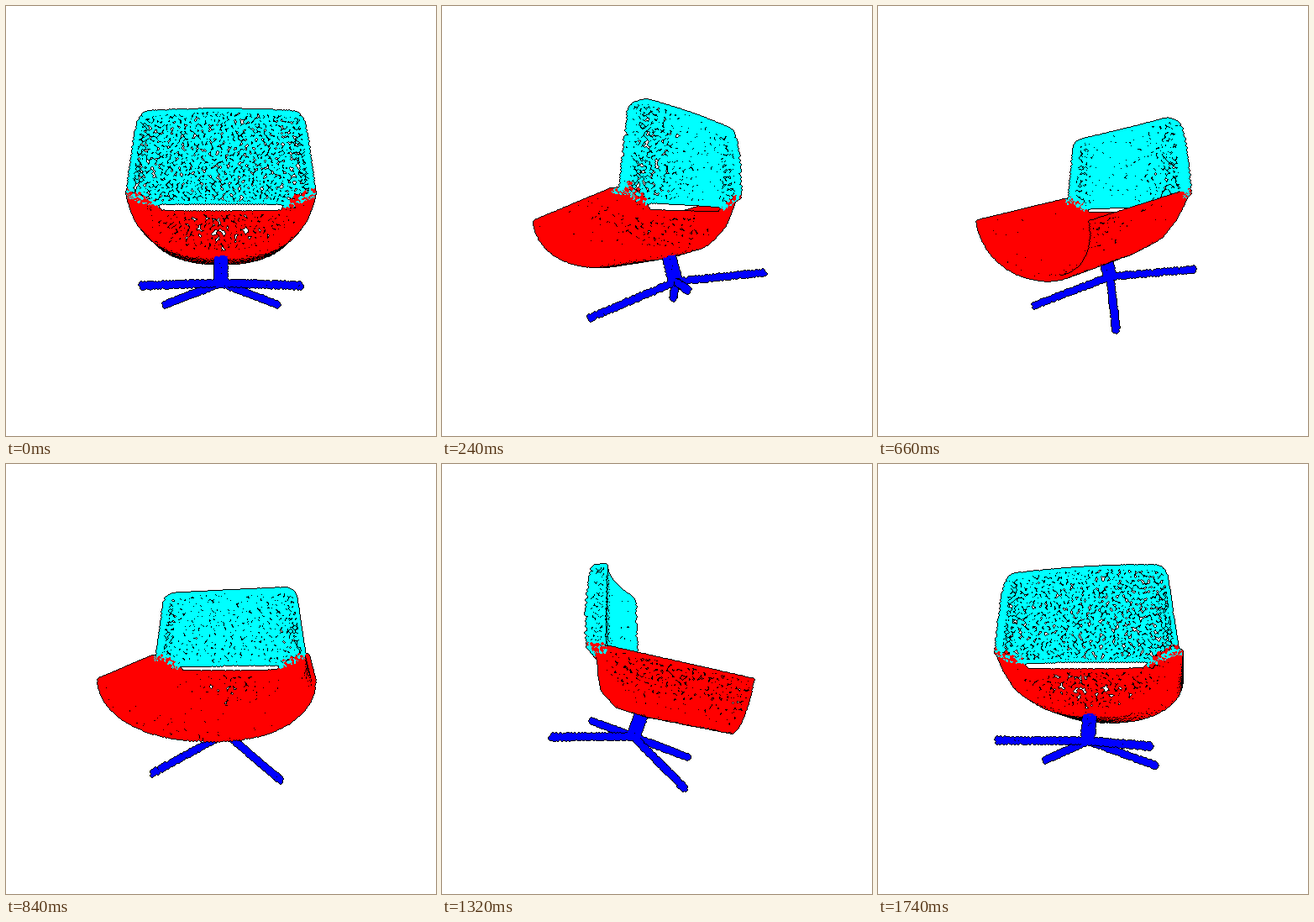
A matplotlib script that plays this animation: 512x512 px, repeating every 1800 ms.

```python
import numpy as np
import matplotlib.pyplot as plt
from matplotlib.animation import FuncAnimation

SIZE, FRAMES, STEP = 512, 30, 60
FOCAL = SIZE / 2 / np.tan(np.radians(30))
CYAN, RED, BLUE = (0, 255, 255), (255, 0, 0), (0, 0, 255)
rng = np.random.default_rng(4)


def spread(n):
    """Evenly scattered pairs in the unit square."""
    i = np.arange(n)
    u = (i * 0.7548777 + rng.random() + rng.normal(0, 0.006, n)) % 1
    v = (i * 0.5698403 + rng.random() + rng.normal(0, 0.006, n)) % 1
    return u, v


def seam(x):
    """Height of the lower edge of the backrest."""
    return np.interp(abs(x), [0, 64, 69, 97], [19.5, 19.5, 18, 30])


def back(u, v, face):
    """Backrest; face runs from -1 (front) to 1 (rear)."""
    x = u * np.interp(v, [0, 0.45, 0.85, 1], [97, 92, 88, 86])
    low = seam(x)
    top = 116 - 3 * u**2 - 10 * abs(u) ** 24
    bow = 4 * v * (1 - v)
    mid = 50 + 3 * v + 3 * bow
    front = mid + (41 - mid) * u**2
    rear = mid + (55 + 4 * bow - mid) * u**4
    z = front + (rear - front) * (face + 1) / 2
    return np.stack([x, low + (top - low) * v, z], 1)


def seat(u, v):
    """Bowl between a centre profile and the raised side rims."""
    knots = [0, 0.11, 0.18, 0.29, 0.48, 0.75, 1]
    cy = np.interp(v, knots, [9, -5, -17, -32, -42, -51, -59])
    cz = np.interp(v, knots, [46, 56, 56, 43, 9, -40, -84])
    rx = np.interp(v, [0, 0.11, 1], [98, 101, 104])
    ry = np.interp(v, [0, 0.11, 1], [29, 29, -1])
    rz = np.interp(v, [0, 0.11, 1], [52, 34, -96])
    power = 2 / 2.2
    a = u * np.pi / 2
    x = rx * np.sign(a) * abs(np.sin(a)) ** power
    w = 1 - np.cos(a) ** power
    edge = np.interp(abs(x), [0, 64, 69, 98], [9, 9, 16, 29])
    k = np.clip(1 - v / 0.06, 0, 1)
    y = (cy + (ry - cy) * w) * (1 - k) + edge * k
    return np.stack([x, y, cz + (rz - cz) * w], 1)


def tube(p, q, r, n):
    p, q = np.array(p, float), np.array(q, float)
    d = (q - p) / np.linalg.norm(q - p)
    e = np.cross(d, [0.3, 1, 0.2])
    e /= np.linalg.norm(e)
    f = np.cross(d, e)
    a, t = spread(n)
    a = a[:, None] * 2 * np.pi
    return p + t[:, None] * (q - p) + r * (np.cos(a) * e + np.sin(a) * f)


def build():
    parts = []

    def add(points, color):
        parts.append((points, np.tile(color, (len(points), 1))))

    u, v = spread(2300)
    add(back(2 * u - 1, v, rng.choice([-1, 1], len(u))), CYAN)
    f, v = spread(200)
    for side in (-1, 1):
        add(back(side + 0 * v, v, 2 * f - 1), CYAN)
    u, f = spread(240)
    add(back(2 * u - 1, 1 + 0 * u, 2 * f - 1), CYAN)
    line = np.linspace(-1, 1, 70)
    for end in (0, 1):
        for face in (-1, 1):
            add(back(line, end + 0 * line, face), CYAN)

    u, v = spread(8000)
    add(seat(2 * u - 1, v), RED)
    line = np.linspace(-1, 1, 110)
    for end in (0, 1):
        add(seat(line, end + 0 * line), RED)
        add(seat(2 * end - 1 + 0 * line, (line + 1) / 2), RED)

    hub = np.array([0, -69, 28.4])
    axis = np.array([0, 0.942, -0.336])
    for side in (-1, 1):
        add(tube(hub, (74 * side, -59.3, 102), 2.3, 210), BLUE)
        add(tube(hub, (73.5 * side, -108, -35.5), 2.3, 210), BLUE)
    add(tube(hub - 2 * axis, hub + 30 * axis, 6, 150), BLUE)
    add(tube(hub + 30 * axis, hub + 34 * axis, 6, 30), RED)
    points, colors = map(np.concatenate, zip(*parts))

    # the two shells mingle along the seam at the sides
    x, y, z = points.T
    mixed = (abs(x) > 68) & (abs(y - seam(x)) < 5) & (z > 35)
    pick = rng.random(len(x)) < 0.5
    colors[mixed & pick] = CYAN
    colors[mixed & ~pick] = RED
    return points, colors.astype(np.uint8)


POINTS, COLORS = build()
SPAN = range(-2, 2)
DISC = [(i, j) for i in SPAN for j in SPAN if (i + 0.5) ** 2 + (j + 0.5) ** 2 < 3]
DY, DX = np.array(DISC).T


def render(k):
    a = 2 * np.pi * k / FRAMES
    x, y, z = POINTS.T
    depth = FOCAL - (z * np.cos(a) - x * np.sin(a))
    s = FOCAL / depth
    px = np.rint(SIZE / 2 + (x * np.cos(a) + z * np.sin(a)) * s).astype(int)
    py = np.rint(SIZE / 2 - y * s).astype(int)

    # far points first, so that near ones overwrite them
    order = np.argsort(-depth)
    rows = (py[order, None] + DY).ravel()
    cols = (px[order, None] + DX).ravel()
    img = np.full((SIZE, SIZE, 3), 255, np.uint8)
    zbuf = np.full((SIZE, SIZE), 1e4)
    img[rows, cols] = np.repeat(COLORS[order], len(DISC), axis=0)
    zbuf[rows, cols] = np.repeat(depth[order], len(DISC))

    # dark line where a neighbour lies clearly in front
    near = np.min([np.roll(zbuf, d, ax) for d in (-1, 1) for ax in (0, 1)], axis=0)
    img[zbuf - near > 12] = 0
    return img


fig = plt.figure(figsize=(SIZE / 100, SIZE / 100), dpi=100)
ax = fig.add_axes([0, 0, 1, 1])
ax.axis("off")
view = ax.imshow(render(0), interpolation="nearest", aspect="auto")


def update(k):
    view.set_data(render(k))
    return (view,)


anim = FuncAnimation(fig, update, frames=FRAMES, interval=STEP, repeat=True, blit=False)
plt.show()
```
